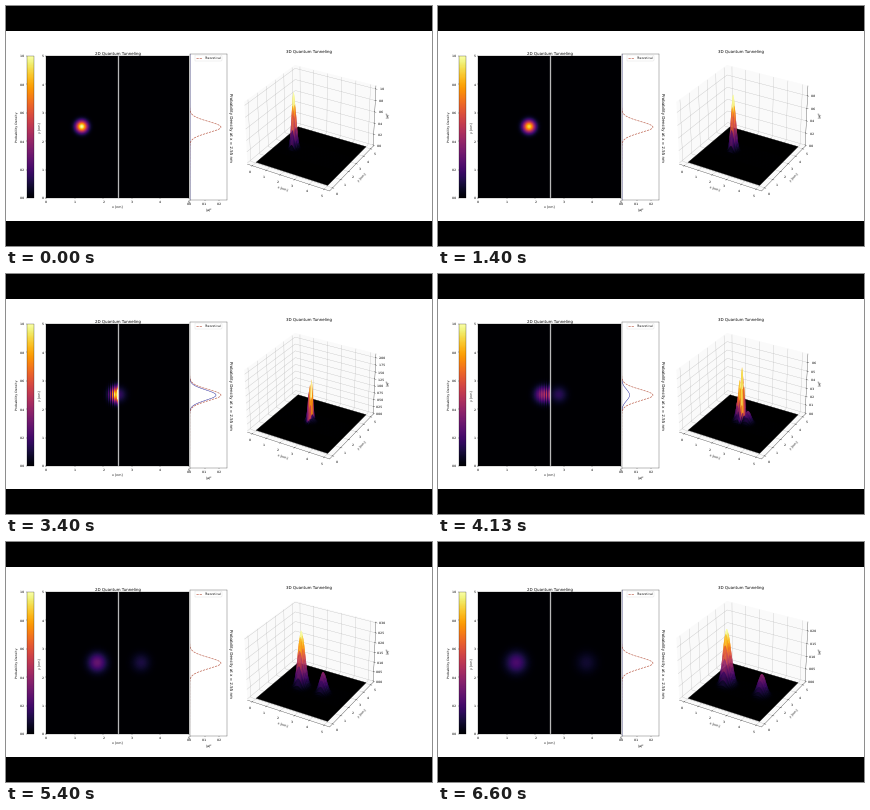
Write a matplotlib script that moves like this. It is 426 px wide and 240 px high and loops after 6.67 s.

```python
import numpy as np
import matplotlib.pyplot as plt
from matplotlib.animation import FuncAnimation
from matplotlib.patches import Rectangle
from matplotlib.ticker import MaxNLocator
from mpl_toolkits.mplot3d.art3d import Poly3DCollection

W, H = 426, 240
FRAMES, LOOP_MS = 100, 6670
L = 5.0                      # box side, nm
X0, Y0, S = 1.25, 2.5, 0.2   # packet start and width
K, SPEED = 41.0, 0.0255      # wave number, nm per frame
D = SPEED / K                # hbar / m per frame
WALL = (2.5, 2.55)
V0 = 1.3 * K**2 / 2
CMAP = "inferno"

plt.rcParams.update({"font.size": 9.86, "font.family": "DejaVu Sans",
                     "text.hinting": "none"})


def evolve(substeps=40, n=1024, left=-0.7, span=6.4):
    """Density along x for every frame, by the split-step Fourier method."""
    dx = span / n
    x = left + dx * (np.arange(n) + 0.5)
    p = 2 * np.pi * np.fft.fftfreq(n, dx)
    wall = (x > WALL[0]) & (x < WALL[1])
    kinetic = np.exp(-0.5j * D * p**2 / substeps)
    half_kick = np.exp(-0.5j * D * V0 * wall / substeps)
    psi = np.exp(-(x - X0) ** 2 / (2 * S**2) + 1j * K * x)
    history = []
    for _ in range(FRAMES):
        history.append(np.abs(psi) ** 2)
        for _ in range(substeps):
            psi = half_kick * np.fft.ifft(kinetic * np.fft.fft(half_kick * psi))
    return x, history


def density_y(y, t):
    width = S * np.sqrt(1 + (t * D / S**2) ** 2)
    return S / width * np.exp(-((y - Y0) / width) ** 2)


def box(x, y, w, h):
    """Pixel box, measured from the top left, in figure fractions."""
    return [x / W, 1 - (y + h) / H, w / W, h / H]


def padded(lo, hi):
    pad = (hi - lo) / 48
    return lo - pad, hi + pad


xs, history = evolve()
cells = (np.arange(200) + 0.5) * L / 200
sx = np.linspace(0.2, 4.8, 139)
sy = np.linspace(1.6, 3.4, 19)
mesh_x, mesh_y = np.meshgrid(sx, sy)
yy = np.linspace(0, L, 300)

fig = plt.figure(figsize=(17.75, 10), dpi=24, facecolor="black")
fig.add_artist(Rectangle((0, 25 / H), 1, 190 / H, transform=fig.transFigure,
                         fc="white", ec="none", zorder=-1))

# Heat map with its colour bar
ax = fig.add_axes(box(40.3, 50, 142.5, 142.3))
im = ax.imshow(np.zeros((200, 200)), cmap=CMAP, vmin=0, vmax=1,
               origin="lower", extent=[0, L, 0, L], aspect="auto")
ax.axvspan(*WALL, color="white", lw=1, alpha=0.65)
ax.set(xlim=(0, L), ylim=(0, L), xticks=range(6), yticks=range(6),
       xlabel="x [nm]", ylabel="y [nm]", title="2D Quantum Tunneling")
bar = fig.colorbar(im, cax=fig.add_axes(box(21.3, 50, 7, 142.3)),
                   ticklocation="left")
bar.set_label("Probability Density")

# Profile behind the wall
side = fig.add_axes(box(183.7, 48, 37.2, 146.2))
profile, = side.plot([], [], color="darkblue", lw=1.2)
side.plot(0.21 * np.exp(-((yy - Y0) / 0.27) ** 2), yy, "--",
          color="#b5503a", lw=1.8, label="Theoretical")
side.set(xlim=(0, 0.25), ylim=(0, L), xticks=[0, 0.1, 0.2], yticks=[],
         xlabel=r"$|\psi|^2$")
side.legend(loc="upper center", fontsize=9, borderaxespad=0.4)
fig.text(225 / W, 1 - 121.3 / H, "Probability Density at x = 2.55 nm",
         size="large", rotation=270, ha="center", va="center")

# Surface
ax3 = fig.add_axes(box(230.4, 48, 146.2, 146.2), projection="3d",
                   computed_zorder=False)
ax3.patch.set_visible(False)
ax3.set(xlabel="x [nm]", ylabel="y [nm]", zlabel=r"$|\psi|^2$",
        xticks=range(6), yticks=range(6))
for axis in (ax3.xaxis, ax3.yaxis, ax3.zaxis):
    axis.set_pane_color((0.98, 0.98, 0.98, 1))
ax3.zaxis.set_major_locator(MaxNLocator(9, steps=[1, 2, 2.5, 5, 10]))
ax3.add_collection3d(Poly3DCollection(
    [[(0, 0, 0), (L, 0, 0), (L, L, 0), (0, L, 0)]],
    facecolor="black", edgecolor="black", zorder=1))
fig.text(302.8 / W, 1 - 44.7 / H, "3D Quantum Tunneling", size="large",
         ha="center", va="center")
surface = None


def update(i):
    global surface
    dens = history[i]
    heat = np.outer(density_y(cells, i), np.interp(cells, xs, dens))
    im.set_data(heat)
    profile.set_data(np.interp(WALL[1], xs, dens) * density_y(yy, i), yy)
    if surface is not None:
        surface.remove()
    z = np.outer(density_y(sy, i), np.interp(sx, xs, dens))
    surface = ax3.plot_surface(mesh_x, mesh_y, z, cmap=CMAP, rstride=1,
                               cstride=1, zorder=2)
    ax3.set_xlim(padded(-0.05 * L, 1.05 * L))
    ax3.set_ylim(padded(-0.05 * L, 1.05 * L))
    ax3.set_zlim(padded(0, 1.04 * heat.max()))
    return im, profile, surface


anim = FuncAnimation(fig, update, frames=FRAMES, interval=LOOP_MS / FRAMES,
                     repeat=True, blit=False)
plt.show()
```
